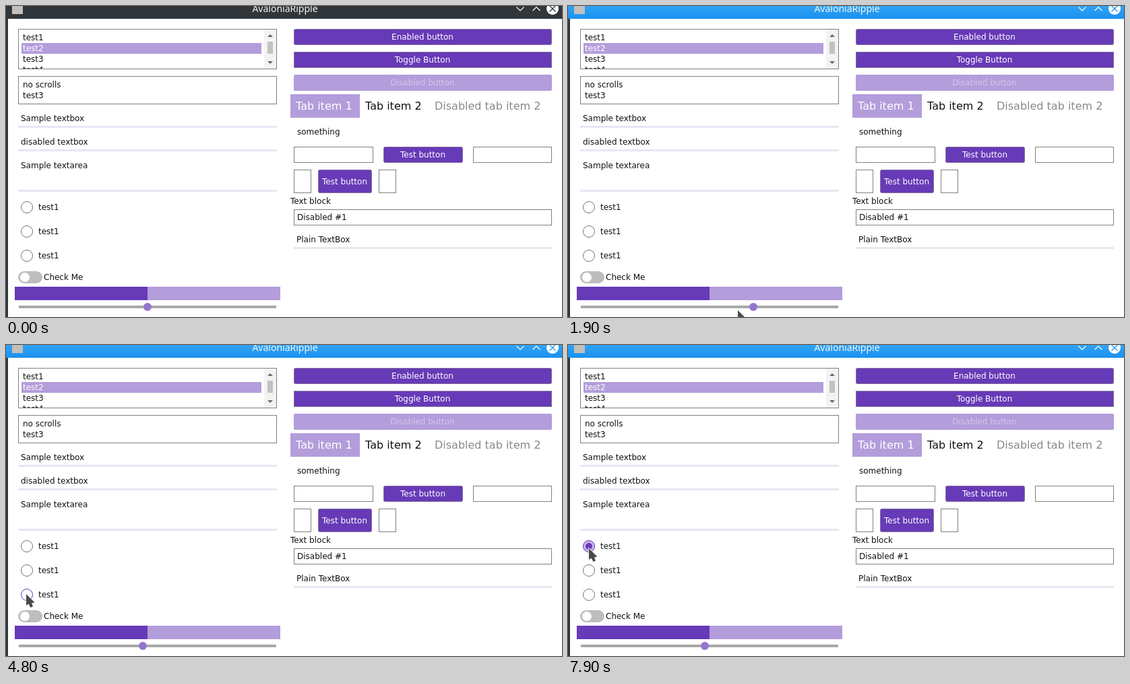
These frames come from a looping animation (825x462 px, 8000 ms). An HTML page:

```html
<!DOCTYPE html>
<html lang="en">
<head>
<meta charset="utf-8">
<title>AvaloniaRipple</title>
<style>
html, body { margin: 0; width: 100%; height: 100%; overflow: hidden; background: #fff; }
svg { display: block; width: 825px; height: 462px; }
text { font: 12px "DejaVu Sans", sans-serif; fill: #111; white-space: pre; }
.tab { font-size: 16px; }
.mid { text-anchor: middle; }
.white { fill: #fff; }
.title { font: 14px "Noto Sans", sans-serif; fill: #f4f6f7; }
.box { fill: #fff; stroke: #808080; }
.deep { fill: #673ab7; }
.edged { stroke: #84739f; }
.pale { fill: #b39ddb; }
.underline { fill: #e8e6f4; }
.glyph { fill: none; stroke: #fff; stroke-width: 1.2; }
</style>
</head>
<body>
<svg id="stage" viewBox="0 0 825 462">
  <defs>
    <linearGradient id="active" x2="0" y2="1">
      <stop stop-color="#31a3f5"/><stop offset="1" stop-color="#1991ee"/>
    </linearGradient>
    <clipPath id="listClip"><rect x="19" y="35" width="364" height="58"/></clipPath>
  </defs>
  <rect width="3" height="462" fill="#31363b"/>
  <rect id="bar" width="825" height="19"/>
  <rect x="9" y="-4" width="16" height="16" fill="#c3bfba"/>
  <text class="title mid" x="414" y="9">AvaloniaRipple</text>
  <path class="glyph" d="M757.5 1.5l5.5 5.5 5.5-5.5M781.5 7l5.5-5.5 5.5 5.5"/>
  <circle cx="811" cy="4" r="9" fill="#fff"/>
  <path id="close" d="M806.500-.5l9 9m0-9l-9 9" stroke-width="1.3"/>
  <g id="content"></g>
  <rect id="track" x="18" y="394" width="36" height="18" rx="9"/>
  <circle id="knob" cy="403" r="7" fill="#fff"/>
  <rect class="deep" x="13" y="417" width="197" height="20"/>
  <rect class="pale" x="210" y="417" width="197" height="20"/>
  <rect x="19" y="445" width="382" height="4" fill="#a9a9a9"/>
  <circle id="thumb" cy="447" r="6" fill="#9575cd"/>
  <g id="radios"></g>
  <path id="cursor" d="M0 0V17L3.500 14.500L6.500 20L10 18.500L8 13.500L12.500 12.500Z"
        fill="#4a4a4a" stroke="#fff" stroke-width="1.4" paint-order="stroke"/>
</svg>
<script>
const $ = id => document.getElementById(id);
const clamp = v => Math.max(0, Math.min(1, v));

const rect = (cls, x, y, w, h, rx = 0) =>
  `<rect class="${cls}" x="${x}" y="${y}" width="${w}" height="${h}" rx="${rx}"/>`;
const text = (x, y, s, cls = '', extra = '') =>
  `<text x="${x}" y="${y}" class="${cls}" ${extra}>${s}</text>`;
const box = (x, y, w, h) => rect('box', x + .5, y + .5, w - 1, h - 1);
const underline = (x, y, w) => rect('underline', x, y, w, 3);
const button = (x, y, w, h, label, rx = 2) =>
  rect('deep edged', x + .5, y + .5, w - 1, h - 1, rx) +
  text(x + w / 2 - .5, y + h / 2 + 4, label, 'mid white');

$('content').innerHTML = [
  box(18, 34, 384, 60),
  rect('pale', 23, 55, 356, 16),
  '<g clip-path="url(#listClip)">',
  [1, 2, 3, 4].map(i => text(25, 35 + 16 * i, 'test' + i, i === 2 ? 'white' : '')).join(''),
  '</g><path d="M383 35h18v58h-18z" fill="#f3f3f3"/>',
  '<path d="M388 53h8v18h-8z" fill="#c2c2c2"/>',
  '<path d="M388 46l4-4 4 4zM388 82l4 4 4-4z" fill="#686868"/>',
  box(18, 104, 384, 42),
  text(25, 121, 'no scrolls'), text(25, 137, 'test3'),
  text(22, 171, 'Sample textbox'), underline(18, 178, 384),
  text(22, 206, 'disabled textbox'), underline(18, 213, 384),
  text(22, 241, 'Sample textarea'), underline(18, 273, 384),
  text(56, 407, 'Check Me'),
  button(427, 34, 383, 24, 'Enabled button'),
  button(427, 68, 383, 24, 'Toggle Button', 0),
  rect('pale', 427, 102, 383, 24, 2),
  text(618, 118, 'Disabled button', 'mid', 'style="fill:#d3c7eb"'),
  rect('pale', 422, 131, 103, 35),
  text(430, 154, 'Tab item 1', 'tab white'),
  text(533, 154, 'Tab item 2', 'tab'),
  text(636, 154, 'Disabled tab item 2', 'tab', 'style="fill:#888"'),
  text(432, 191, 'something'),
  box(427, 209, 118, 24), button(560, 209, 118, 24, 'Test button'), box(693, 209, 117, 24),
  box(427, 243, 26, 35), button(463, 243, 80, 35, 'Test button'), box(553, 243, 26, 35),
  text(422, 294, 'Text block'),
  box(427, 302, 383, 24), text(432, 318, 'Disabled #1'),
  text(431, 351, 'Plain TextBox'), underline(427, 358, 383)
].join('');

// Each radio is pressed at `press` and loses its dot at `clear`.
const radios = [
  { y: 299, press: 7400, clear: 9000 },
  { y: 335, press: 6300, clear: 7600 },
  { y: 371, press: 5200, clear: 6500 }
];
$('radios').innerHTML = radios.map(({ y }, i) => `
  <clipPath id="clip${i}"><circle cx="31" cy="${y}" r="9"/></clipPath>
  <circle id="ripple${i}" clip-path="url(#clip${i})" fill="#c9b8ea"/>
  <circle id="ring${i}" cx="31" cy="${y}" r="8.5" fill="none"/>
  <circle id="dot${i}" class="deep" cx="31" cy="${y}"/>
  ${text(48, y + 4, 'test1')}`).join('');

// Pointer path: time, x, y
const path = [
  [500, 211, 452], [600, 213, 443], [800, 213, 443], [900, 217, 443], [1000, 228, 443],
  [1300, 284, 445], [1500, 310, 447], [1600, 311, 448], [1700, 298, 450], [1900, 252, 452],
  [2000, 203, 450], [2200, 95, 425], [2400, 14, 401], [2500, 14, 401], [2700, 3, 397],
  [3000, 21, 403], [3600, 21, 403], [3800, 26, 403], [4200, 26, 403], [4800, 30, 370],
  [5500, 30, 370], [5900, 30, 340], [6700, 30, 340], [7100, 31, 302], [8000, 31, 302]
];
function pointerAt(t) {
  const i = Math.max(1, path.findIndex(k => k[0] >= t));
  const [t0, x0, y0] = path[i - 1], [t1, x1, y1] = path[i];
  const p = clamp((t - t0) / (t1 - t0));
  return [x0 + (x1 - x0) * p, y0 + (y1 - y0) * p];
}

function set(id, attrs) {
  for (const name in attrs) $(id).setAttribute(name, attrs[name]);
}

function drawRadio({ y, press, clear }, i, t, [px, py]) {
  const age = t - press;
  const hover = t >= 500 && Math.hypot(px - 31, py - y) < 9;
  const selected = age >= 100 && t < clear;
  const [cx, cy] = pointerAt(press);
  set('ripple' + i, {
    cx, cy,
    r: age < 0 ? 0 : 3 + 15 * clamp(age / 300),
    opacity: clamp((900 - age) / 300)
  });
  set('ring' + i, { stroke: hover || selected ? '#673ab7' : '#757575' });
  set('dot' + i, { r: selected ? 5 * clamp(age / 200) : 0 });
}

function draw(t) {
  const active = t >= 900;
  const pointer = pointerAt(t);
  set('bar', { fill: active ? 'url(#active)' : '#31363b' });
  set('close', { stroke: active ? '#1d99f3' : '#31363b' });
  set('cursor', {
    transform: `translate(${pointer})`,
    visibility: t < 500 ? 'hidden' : 'visible'
  });

  // The slider trails the pointer by one step.
  set('thumb', { cx: t < 1000 ? 210 : pointerAt(Math.min(t - 100, 2000))[0] });

  const on = clamp((t - 3300) / 200) - clamp((t - 4000) / 200);
  const mix = (a, b) => Math.round(a + (b - a) * on);
  set('track', { fill: `rgb(${mix(189, 149)},${mix(189, 117)},${mix(189, 205)})` });
  set('knob', { cx: 28 + 16 * on });

  radios.forEach((radio, i) => drawRadio(radio, i, t, pointer));
}

const start = performance.now();
function tick() {
  const t = (performance.now() - start) % 8000;
  draw(Math.floor(t / 100) * 100);
  requestAnimationFrame(tick);
}
tick();
</script>
</body>
</html>
```
